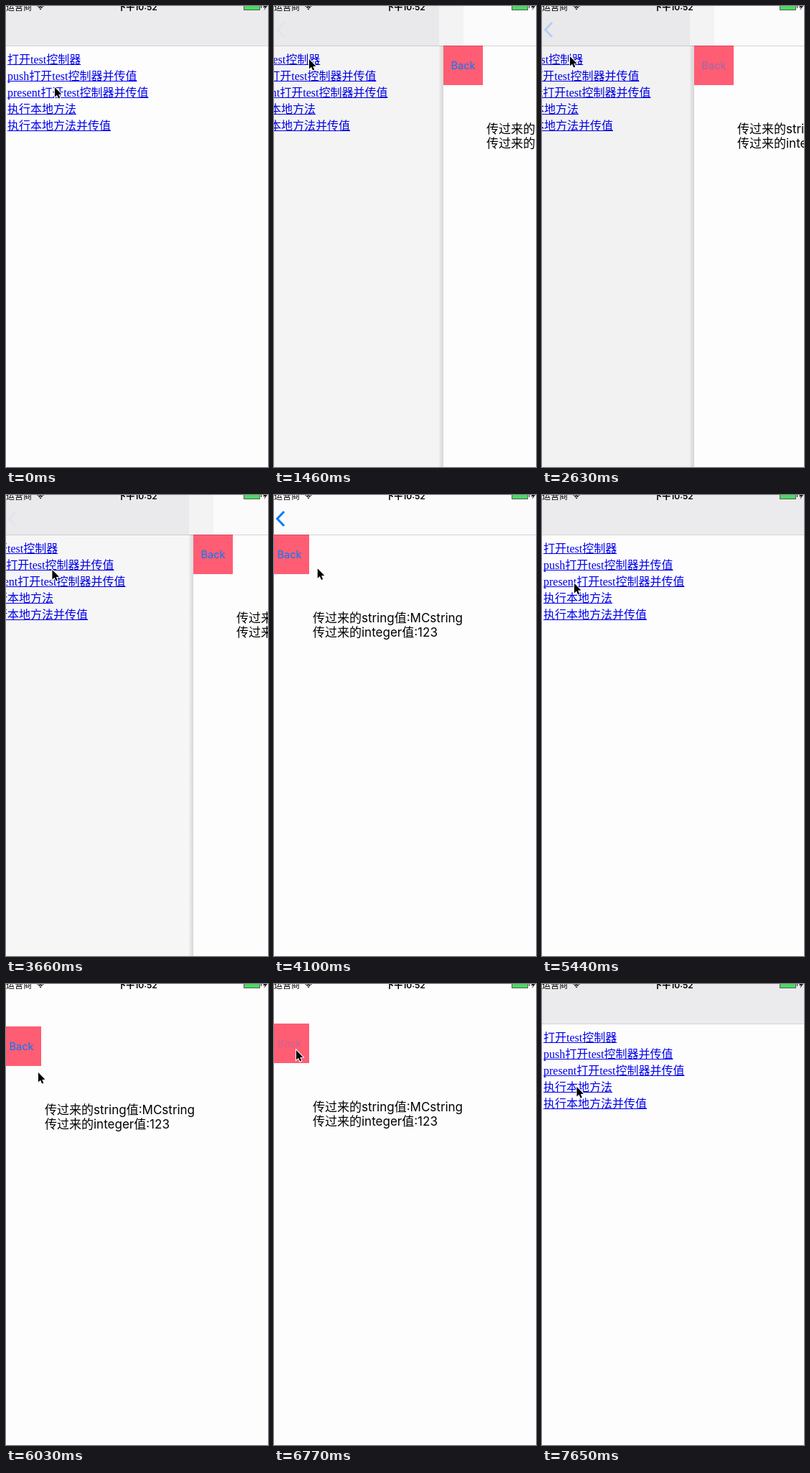
Animation of 365x641 px, one loop 8 s. Source, as an HTML page with a canvas:

```html
<!DOCTYPE html>
<html lang="zh-CN">
<head>
<meta charset="utf-8">
<style>
  html, body { margin: 0; width: 365px; height: 641px; overflow: hidden; background: #fdfdfd; }
  canvas { display: block; }
</style>
</head>
<body>
<canvas id="stage" width="365" height="641"></canvas>
<script>
const W = 365, H = 641, LOOP = 8000, STEP = 147.1;
const SCREEN = { x: -6, y: -9, w: 375, h: 667 }; // phone screen, cropped by the stage
const BAR_BOTTOM = 55, PAPER = '#fdfdfd', BLUE = '#007aff';
const SERIF = "'Liberation Serif', 'Noto Sans CJK SC', 'Noto Sans CJK', serif";
const SANS = "Inter, 'Noto Sans CJK SC', 'Noto Sans CJK', sans-serif";

const LINKS = ['打开test控制器', 'push打开test控制器并传值', 'present打开test控制器并传值', '执行本地方法', '执行本地方法并传值'];
const PUSHES = [[1402.6, 2540.8], [3619.2, 4813.2]]; // open, close
const MODALS = [[5630, 6830]];
const CLOSES = [...PUSHES, ...MODALS].map(([, close]) => close);
// cursor moves: start, end, x, y
const MOVES = [
  [50, 740, 48, 73], [1780, 2420, 38, 69], [2800, 3560, 63.5, 103], [3950, 4660, 37.5, 91],
  [5000, 5460, 44, 122], [6090, 6640, 30, 91], [6920, 7210, 45, 137], [7380, 7640, 47.5, 142]
];

const ctx = document.getElementById('stage').getContext('2d');
const clamp = v => Math.min(1, Math.max(0, v));
const smooth = v => v * v * (3 - 2 * v);

// critically damped spring
function spring(ms) {
  const x = Math.max(0, ms) * Math.sqrt(1000 / 3) / 1000;
  return 1 - (1 + x) * Math.exp(-x);
}

const shown = (spans, t) => spans.reduce((sum, [open, close]) => sum + spring(t - open) - spring(t - close), 0);

function rect(color, x, y, w, h) {
  ctx.fillStyle = color;
  ctx.fillRect(x, y, w, h);
}

function label(str, x, y, font, color = '#000', align = 'left') {
  ctx.font = font;
  ctx.fillStyle = color;
  ctx.textAlign = align;
  ctx.fillText(str, x, y);
}

function polygon(points) {
  ctx.beginPath();
  points.forEach(([x, y]) => ctx.lineTo(x, y));
  ctx.closePath();
}

function drawList(cover) {
  const x = 2 + Math.round(-0.3 * SCREEN.w * cover);
  LINKS.forEach((link, i) => {
    const y = 80 + 23 * i;
    label(link, x, y, '16px ' + SERIF, '#0000ee');
    ctx.fillRect(x, y + 1, ctx.measureText(link).width, 1);
  });
  rect(`rgba(0,0,0,${0.1 * cover})`, 0, 0, W, H);
}

function drawPage(x, y, t) {
  const close = CLOSES.find(c => t > c - 130 && t < c + 450);
  ctx.save();
  ctx.translate(x, y);
  rect(PAPER, 0, SCREEN.y, SCREEN.w, SCREEN.h);
  rect('#ff5d74', 0, BAR_BOTTOM, 55, 55);
  ctx.globalAlpha = close ? 0.2 + 0.8 * clamp((t - close) / 450) : 1;
  label('Back', 27.5, 88, '14.6px ' + SANS, BLUE, 'center');
  ctx.globalAlpha = 1;
  label('传过来的string值:MCstring', 60, 177, '17px ' + SANS);
  label('传过来的integer值:123', 60, 197, '17px ' + SANS);
  ctx.restore();
}

function drawShadow(x) {
  const g = ctx.createLinearGradient(x - 6, 0, x, 0);
  g.addColorStop(0, 'rgba(0,0,0,.03)');
  g.addColorStop(1, 'rgba(0,0,0,.12)');
  rect(g, x - 6, BAR_BOTTOM, 6, H);
}

function drawBar(cover, pageX, popping) {
  rect('#ebebed', 0, 0, W, BAR_BOTTOM);
  rect(`rgba(0,0,0,${0.02 * cover})`, 0, 0, W, BAR_BOTTOM);
  if (cover > 0.002) {
    const soft = 28 * clamp((1 - cover) * 8);
    rect('#f3f3f4', pageX - 6, 0, SCREEN.w + 6, BAR_BOTTOM);
    rect('#fbfbfb', pageX + soft, 0, SCREEN.w, BAR_BOTTOM);
    ctx.globalAlpha = popping ? cover ** 1.7 : Math.max(0.04, (cover - 0.4) / 0.6);
    ctx.strokeStyle = BLUE;
    ctx.lineWidth = 3;
    ctx.beginPath();
    ctx.moveTo(14, 23);
    ctx.lineTo(4.5, 33);
    ctx.lineTo(14, 43);
    ctx.stroke();
    ctx.globalAlpha = 1;
  }
  rect('rgba(0,0,0,.16)', 0, BAR_BOTTOM, W, 1);
}

function drawStatus() {
  label('运营商', 0, 5.5, '12px ' + SANS);
  label('下午10:52', 183, 5.5, '600 12px ' + SANS, '#000', 'center');
  ctx.strokeStyle = '#000';
  ctx.lineWidth = 1.7;
  for (const r of [3.6, 6.4]) {
    ctx.beginPath();
    ctx.arc(48, 5, r, -Math.PI * 0.75, -Math.PI * 0.25);
    ctx.stroke();
  }
  ctx.fillStyle = '#000';
  polygon([[48, 5.5], [46.3, 3.6], [49.7, 3.6]]);
  ctx.fill();
  rect('#5a5a5a', 331, -4, 23, 10);
  rect('#4cd964', 332, -3, 21, 8);
  rect('#222', 355, -1, 1, 4);
  polygon([[362, -4], [358, 2], [360.8, 2], [359.5, 6], [364, 0], [361.2, 0]]);
  ctx.fill();
}

function drawCursor(t) {
  let x = 67, y = 112;
  for (const [start, end, toX, toY] of MOVES) {
    const k = smooth(clamp((t - start) / (end - start)));
    x += (toX - x) * k;
    y += (toY - y) * k;
  }
  ctx.save();
  ctx.translate(x + 0.5, y + 0.5);
  ctx.scale(0.88, 0.88);
  polygon([[0.5, 0.5], [0.5, 16], [4, 12.7], [6.4, 18.3], [8.9, 17.2], [6.5, 11.8], [11.3, 11.6]]);
  ctx.strokeStyle = '#fff';
  ctx.lineWidth = 2.2;
  ctx.stroke();
  ctx.fillStyle = '#000';
  ctx.fill();
  ctx.restore();
}

function draw(t) {
  const cover = shown(PUSHES, t), modal = shown(MODALS, t);
  const pageX = Math.round(SCREEN.x + SCREEN.w * (1 - cover));
  const popping = PUSHES.some(([, close]) => t > close && t < close + 800);
  rect(PAPER, 0, 0, W, H);
  drawList(cover);
  if (cover > 0.002) {
    drawShadow(pageX);
    drawPage(pageX, 0, t);
  }
  drawBar(cover, pageX, popping);
  if (modal > 0.002) drawPage(SCREEN.x, Math.round(SCREEN.h * (1 - modal)), t);
  drawStatus();
  drawCursor(t);
}

// the picture advances in steps of about 147 ms
function tick() {
  const t = performance.now() % LOOP;
  draw(Math.floor((t + 20) / STEP) * STEP);
  requestAnimationFrame(tick);
}
tick();
</script>
</body>
</html>
```
